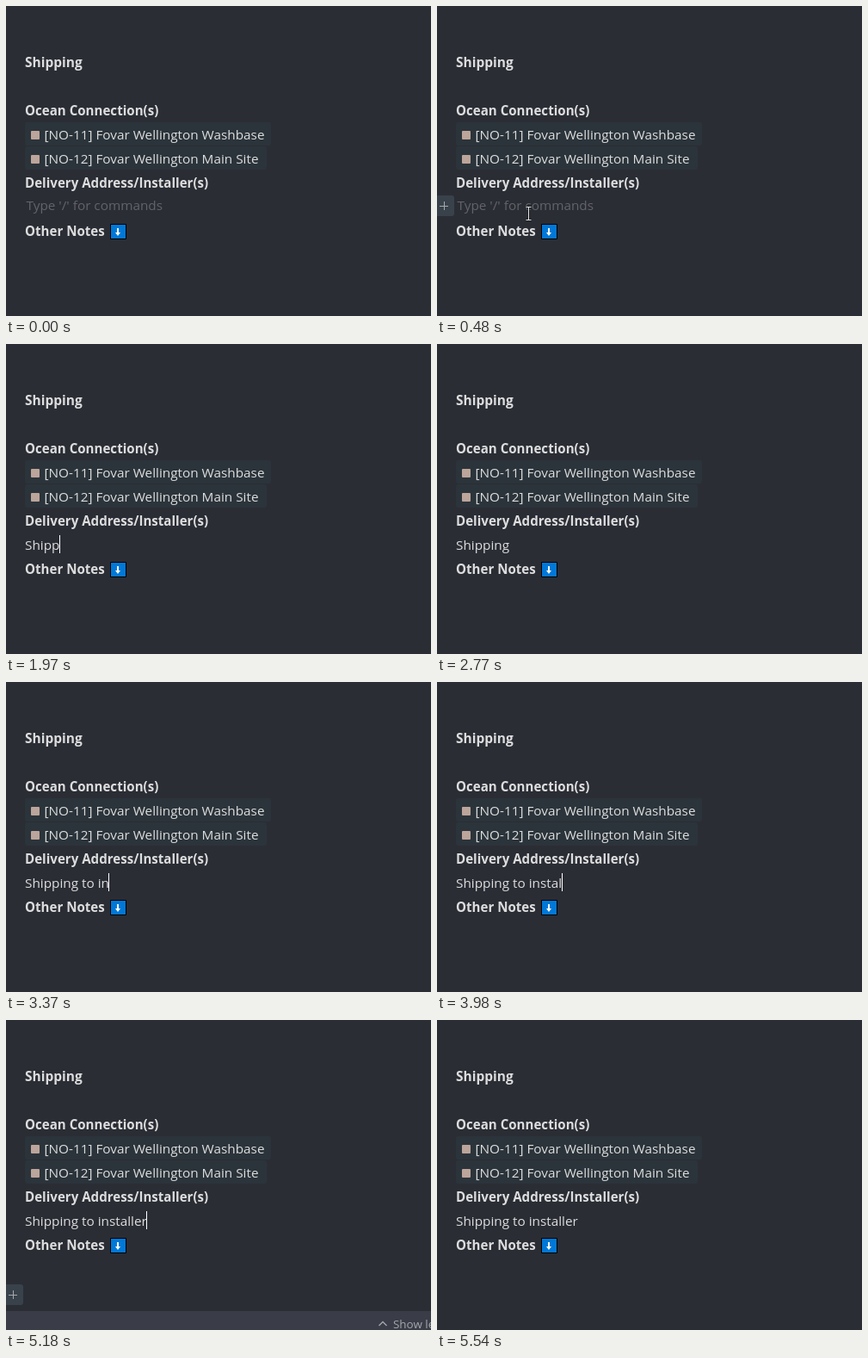
An HTML page with a canvas for the animation above (5680 ms loop, 494 by 360 pixels).

```html
<!DOCTYPE html>
<html lang="en">
<head>
<meta charset="utf-8">
<style>
  html, body { margin: 0; width: 100%; height: 100%; overflow: hidden; background: #2b2d35; }
  canvas { display: block; }
</style>
</head>
<body>
<canvas id="stage" width="494" height="360"></canvas>
<script>
const ctx = document.getElementById('stage').getContext('2d');
const LOOP = 5680;
const REGULAR = '15.32px "Open Sans", sans-serif';
const BOLD = 'bold 15.1px "Open Sans", sans-serif';
const TITLE = 'bold 15.5px "Open Sans", sans-serif';
const SMALL = '13.4px "Open Sans", sans-serif';
const SENTENCE = 'Shipping to installer';

// Moment at which each character of the sentence appears
const KEYS = [1090, 1440, 1640, 1770, 1970, 2170, 2310, 2570, 2700, 2900,
  2980, 3030, 3230, 3300, 3450, 3650, 3850, 3980, 4050, 4170, 4240];

const within = (t, from, to) => t >= from && t < to;
const easeOut = p => 1 - (1 - p) ** 2;

function text(str, x, y, font = REGULAR, color = '#dcdddd') {
  ctx.font = font;
  ctx.fillStyle = color;
  ctx.fillText(str, x, y);
}

function box(x, y, w, h, r, color) {
  ctx.fillStyle = color;
  ctx.beginPath();
  ctx.roundRect(x, y, w, h, r);
  ctx.fill();
}

function line(color, width, ...points) {
  ctx.strokeStyle = color;
  ctx.lineWidth = width;
  ctx.beginPath();
  points.forEach(([x, y]) => ctx.lineTo(x, y));
  ctx.stroke();
}

function chip(y, width, label) {
  box(22, y, width, 27, 3, '#2c343b');
  box(29, y + 10, 10, 10, 1, '#bca59a');
  text(label, 44.5, y + 20);
}

function arrowEmoji() {
  box(121, 253, 19, 18, 1, '#000');
  box(122, 254, 17, 16, 0, '#0078d7');
  line('#fff', 2, [130, 258], [130, 264]);
  ctx.fillStyle = '#fff';
  ctx.beginPath();
  ctx.moveTo(127, 263);
  ctx.lineTo(133, 263);
  ctx.lineTo(130, 267);
  ctx.fill();
}

function plusButton(y) {
  box(0, y, 20, 24, [0, 3, 3, 0], '#39424a');
  line('#a4a9ae', 1, [3, y + 12.5], [13, y + 12.5]);
  line('#a4a9ae', 1, [8.5, y + 7], [8.5, y + 17]);
}

function pointer(x, y) {
  for (const [color, width] of [['#1b1c20', 2.4], ['#e4e4e4', 1]]) {
    line(color, width, [x, y - 7], [x, y + 8]);
    line(color, width, [x - 3, y - 7.5], [x + 3, y - 7.5]);
    line(color, width, [x - 3, y + 7.5], [x + 3, y + 7.5]);
  }
}

function page() {
  ctx.fillStyle = '#2b2d35';
  ctx.fillRect(0, 0, 494, 360);
  text('Shipping', 22, 71, TITLE);
  text('Ocean Connection(s)', 22, 127, BOLD);
  chip(135, 286, '[NO-11] Fovar Wellington Washbase');
  chip(163, 281, '[NO-12] Fovar Wellington Main Site');
  text('Delivery Address/Installer(s)', 22, 211, BOLD);
  text('Other Notes', 22, 267, BOLD);
  arrowEmoji();
}

function typing(t) {
  const typed = SENTENCE.slice(0, KEYS.filter(k => k <= t).length);
  if (!typed) {
    text("Type '/' for commands", 23.5, 237, REGULAR, '#626469');
    return;
  }
  text(typed, 22, 239);
  const caretOff = within(t, 2770, 2900) || within(t, 4770, 5050) || t >= 5540;
  if (!caretOff) {
    const x = Math.floor(22 + ctx.measureText(typed).width);
    box(x, 222, 1, 21, 0, '#fff');
  }
}

function hover(t) {
  if (within(t, 340, 1160)) plusButton(220);
  if (within(t, 4910, 5330)) plusButton(307);
  if (within(t, 5110, 5330)) box(0, 338, 494, 22, 0, '#3a3d47');
  if (within(t, 5110, 5400)) {
    const gray = '#a5a7ad';
    line(gray, 1.3, [433.5, 355], [438, 350.5], [442.5, 355]);
    text('Show less', 450, 358, SMALL, gray);
  }
  if (within(t, 70, 1160)) {
    const p = easeOut(Math.min(1, (t - 70) / 400));
    pointer(231.5 - 125 * p, 313 - 72 * p);
  } else if (within(t, 4840, 5110)) {
    const p = (t - 4840) / 270;
    pointer(106.5 + 40 * p, 250 + 120 * p);
  }
}

function frame() {
  const t = performance.now() % LOOP;
  page();
  typing(t);
  hover(t);
  requestAnimationFrame(frame);
}
frame();
</script>
</body>
</html>
```
